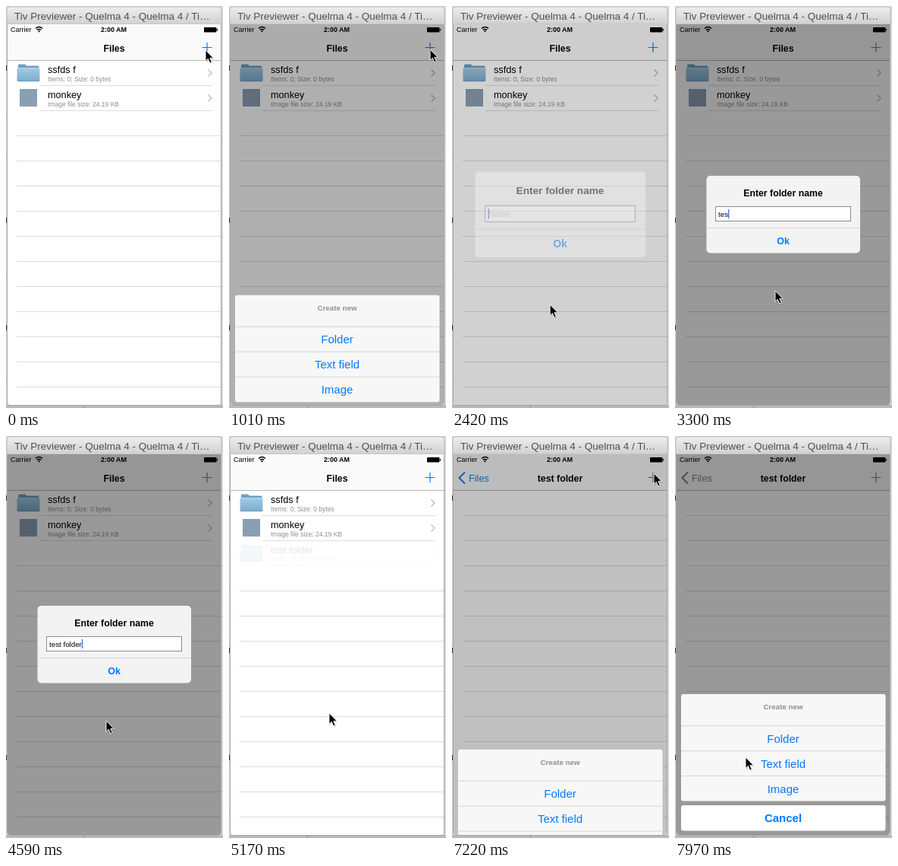
These frames come from a looping animation (286x528 px, 8000 ms). An HTML page:

```html
<!DOCTYPE html>
<html lang="en">
<head>
<meta charset="utf-8">
<title>Files</title>
<style>
  html, body { margin: 0; width: 100%; height: 100%; overflow: hidden; background: #d6d6d6; }
  svg { display: block; }
  text { font-family: "Liberation Sans", Arial, sans-serif; white-space: pre; }
  .mid { text-anchor: middle; }
  .bold { font-weight: 700; }
  .head { font-size: 12.3px; font-weight: 700; }
  .name { font-size: 12.7px; }
  .info { font-size: 8.5px; fill: #8e8e93; }
  .status { font-size: 9px; }
  .choice { font-size: 15px; fill: #007aff; text-anchor: middle; }
  .input { font-size: 9.75px; }
  .line { stroke: #dcdcde; }
  .rule { stroke: #d6d6d8; }
  .tint { stroke: var(--tint); fill: none; }
  .label { fill: var(--tint); }
</style>
</head>
<body>
<svg id="stage" width="286" height="528" viewBox="0 0 286 528">
  <defs>
    <linearGradient id="bar" x2="0" y2="1">
      <stop stop-color="#eeeeee"/><stop offset="1" stop-color="#d0d0d0"/>
    </linearGradient>
    <linearGradient id="paper" x2="0" y2="1">
      <stop stop-color="#a3cbe4"/><stop offset="1" stop-color="#7aaccd"/>
    </linearGradient>
    <clipPath id="screen"><path d="M2 24H283V520Q283 524 279 524H6Q2 524 2 520Z"/></clipPath>
    <g id="folder">
      <path d="M16 78Q16 76.500 17.500 76.500H25L27 78.500H42Q43.500 78.500 43.500 80V85H16Z" fill="#6d9fc2"/>
      <rect x="14.500" y="81" width="30" height="18" rx="1.500" fill="url(#paper)"/>
      <path d="M15 81.500H44" stroke="#bcdcee"/>
      <path d="M15.500 98.700H43.500" stroke="#6795b5" stroke-width=".8"/>
    </g>
    <path id="more" d="M266.500 83.500L271 88L266.500 92.500" fill="none" stroke="#c2c2c7" stroke-width="1.500"/>
  </defs>

  <!-- desktop behind the window -->
  <rect width="286" height="528" fill="#d6d6d6"/>
  <path d="M0 147.500H2M0 200.500H2M0 352.500H2M0 493.500H2" stroke="#aaa"/>
  <path d="M0 78V85M0 278V285M0 419V426" stroke="#333" stroke-width="2"/>
  <rect y="524" width="286" height="4" fill="#b9b9b9"/>
  <path d="M103.500 524V528" stroke="#8c8c8c"/>
  <path d="M1.500 24V521Q1.500 524.500 6 524.500H279Q283.500 524.500 283.500 520V24" fill="none" stroke="#a5a5a5"/>

  <path d="M1 24V6Q1 1 6 1H279Q284 1 284 6V24Z" fill="url(#bar)" stroke="#b4b4b4" stroke-width=".8"/>
  <text x="11" y="18" font-size="13.500" fill="#505050">Tiv Previewer - Quelma 4 - Quelma 4 / Ti…</text>

  <g clip-path="url(#screen)">
    <rect x="2" y="24" width="281" height="500" fill="#fff"/>
    <g id="home"></g>
    <g id="inner"></g>

    <rect x="2" y="24" width="281" height="47" fill="#fafafa"/>
    <path d="M2 71.500H283" stroke="#b7b7b9"/>
    <g class="status">
      <text x="6" y="34.300">Carrier</text>
      <text x="142" y="34.300" class="mid bold">2:00 AM</text>
      <path d="M39 29.500Q43.500 25.500 48 29.500M40.800 31.600Q43.500 29.200 46.200 31.600" fill="none" stroke="#000" stroke-width="1.400"/>
      <path d="M42 32.800Q43.500 31.500 45 32.800L43.500 34.800Z"/>
      <rect x="261" y="28" width="16.500" height="6.500" rx="1"/>
      <path d="M278.500 30V32.500" stroke="#000"/>
    </g>
    <text id="homeTitle" x="142.500" y="59.500" class="head mid">Files</text>
    <text id="innerTitle" x="142.500" y="59.500" class="head mid">test folder</text>
    <g id="back">
      <path class="tint" d="M17 47.500L9.500 55L17 62.500" stroke-width="2"/>
      <text id="backLabel" x="22" y="59.500" class="label" font-size="12.700">Files</text>
    </g>
    <path class="tint" d="M258.500 54.500H271.500M265 48V61" stroke-width="1.200"/>

    <rect id="dim" x="2" y="24" width="281" height="500"/>

    <g id="sheet">
      <rect x="8" y="339" width="269.500" height="140.500" rx="3" fill="#f7f7f7"/>
      <path class="rule" d="M8 380.500H277.500M8 413.500H277.500M8 446.500H277.500"/>
      <text x="142.500" y="359.300" class="mid bold" font-size="9.750" fill="#8f8f8f">Create new</text>
      <text x="142.500" y="402.500" class="choice">Folder</text>
      <text x="142.500" y="435.500" class="choice">Text field</text>
      <text x="142.500" y="468.500" class="choice">Image</text>
      <rect x="8" y="485" width="269.500" height="33.500" rx="3" fill="#fff"/>
      <text x="142.500" y="507.300" class="choice bold">Cancel</text>
    </g>

    <g id="alert">
      <rect x="41.500" y="223" width="202.500" height="101.500" rx="5" fill="#f3f3f3"/>
      <text x="142.500" y="250" class="head mid">Enter folder name</text>
      <rect x="53.500" y="263.500" width="178" height="19" fill="#fff" stroke="#8c8c8c"/>
      <text id="hint" x="57" y="276.600" class="input" fill="#c0c0c5">Name</text>
      <text id="typed" x="57" y="276.600" class="input"></text>
      <rect id="caret" y="267" width="1.300" height="12" fill="#3f6bf0"/>
      <path class="rule" d="M41.500 291.500H244"/>
      <text x="142.500" y="312.700" class="mid bold" font-size="12.500" fill="#007aff">Ok</text>
    </g>
  </g>

  <g id="cursor">
    <path d="M1 2V16L4.200 13L6.600 18L9 17L6.800 12H11Z" fill="#000" opacity=".2"/>
    <path d="M0 0V14.300L3.300 11.300L5.700 17L8.200 15.900L5.800 10.400H10.300Z" fill="#000" stroke="#fff" stroke-width=".9"/>
  </g>
</svg>
<script>
const LOOP = 8000, WIDTH = 281, ROW = 33, TOP = 71;
const $ = id => document.getElementById(id);

// Separator lines below list rows, counted from `first`.
const lines = first => {
  let out = '';
  for (let n = first; n <= 13; n++) {
    const y = TOP + n * ROW + 0.5;
    out += `<path class="line" id="${first === 3 ? 'h' + n : 'i' + n}" d="M14 ${y}H283"/>`;
  }
  return out;
};

const row = (n, name, info, icon) => `
  <g id="row${n}">
    <rect id="press${n}" x="2" y="${TOP + n * ROW + 1}" width="281" height="32" fill="#d9d9d9" opacity="0"/>
    ${icon}
    <text x="55" y="${TOP + n * ROW + 16.5}" class="name">${name}</text>
    <text x="55" y="${TOP + n * ROW + 28}" class="info">${info}</text>
    <use href="#more" y="${n * ROW}"/>
    <path class="line" d="M44 ${TOP + (n + 1) * ROW + 0.5}H272"/>
  </g>`;

const folder = n => `<use href="#folder" y="${n * ROW}"/>`;
const picture = '<rect x="18" y="109" width="23" height="23" fill="#8b9fb3"/>';

$('home').innerHTML = lines(3)
  + row(0, 'ssfds f', 'Items: 0; Size: 0 bytes', folder(0))
  + row(1, 'monkey', 'Image file size: 24.19 KB', picture)
  + row(2, 'test folder', 'Items: 0; Size: 0 bytes', folder(2));
$('inner').innerHTML = `<rect x="-2" y="72" width="4" height="452" opacity=".08"/>
  <rect x="2" y="72" width="281" height="452" fill="#fff"/>` + lines(1);

const clamp = x => Math.max(0, Math.min(1, x));
const easeOut = p => 1 - (1 - p) ** 2.2;
const smooth = p => p * p * (3 - 2 * p);
const ramp = (t, start, length) => easeOut(clamp((t - start) / length));

// Pointer stops: time, x, y
const stops = [
  [0, 263, 58], [60, 263, 58], [130, 264, 60], [240, 265, 57],
  [1150, 265, 57], [1540, 129, 393], [2390, 129, 393], [2650, 132, 374],
  [5110, 132, 374], [5170, 132, 364], [5520, 130, 151], [6220, 130, 151],
  [6580, 254.5, 36], [6750, 263, 43], [6800, 263, 43], [6870, 266, 49],
  [7400, 266, 49], [7910, 88, 409], [7965, 88, 409], [7970, 93, 422]
];

function pointer(t) {
  const next = stops.findIndex(s => s[0] > t);
  if (next < 0) return stops[stops.length - 1].slice(1);
  const a = stops[next - 1], b = stops[next];
  const p = smooth((t - a[0]) / (b[0] - a[0]));
  return [a[1] + (b[1] - a[1]) * p, a[2] + (b[2] - a[2]) * p];
}

const word = 'test folder';
const keys = [2880, 3060, 3300, 3540, 3710, 3890, 4010, 4180, 4300, 4410, 4590];

const fade = (id, value) => $(id).setAttribute('opacity', value);
const move = (id, x, y) => $(id).setAttribute('transform', `translate(${x} ${y})`);
const mix = (a, b, p) => a.map((v, i) => Math.round(v + (b[i] - v) * p));

function draw(t) {
  const sheet = t < 5000
    ? ramp(t, 810, 400) - ramp(t, 1885, 265)
    : ramp(t, 7080, 400);
  const alertIn = ramp(t, 2330, 380), alertOut = ramp(t, 4730, 270);
  const shown = alertIn - alertOut;
  const dim = Math.max(sheet, shown);

  fade('dim', 0.4 * dim);
  $('stage').style.setProperty('--tint', `rgb(${mix([0, 122, 255], [128, 128, 130], dim ** 3)})`);
  move('sheet', 0, 189 * (1 - sheet));
  fade('sheet', sheet > 0 ? 1 : 0);

  const scale = 1.2 - 0.2 * alertIn;
  fade('alert', shown);
  $('alert').setAttribute('transform', `translate(142.5 274) scale(${scale}) translate(-142.5 -274)`);
  const count = keys.filter(k => k <= t).length;
  $('typed').textContent = word.slice(0, count);
  fade('hint', count ? 0 : 1);
  $('caret').setAttribute('x', 57 + (count ? $('typed').getComputedTextLength() : 0));

  // The new row fades in where an empty one was.
  const added = smooth(clamp((t - 5110) / 310));
  fade('row2', added);
  fade('h3', t < 5110 ? 1 : 0);
  fade('press2', t >= 5990 ? 1 : 0);

  const push = ramp(t, 6010, 480);
  move('home', -0.3 * WIDTH * push, 0);
  move('inner', WIDTH * (1 - push), 0);
  fade('inner', push > 0 ? 1 : 0);
  move('homeTitle', -107 * push, 0);
  fade('homeTitle', clamp(1 - push * 1.6));
  move('innerTitle', 120 * (1 - push), 0);
  fade('innerTitle', push);
  move('backLabel', 107 * (1 - push), 0);
  fade('back', clamp(push * 1.6 - 0.6));

  move('cursor', ...pointer(t));
}

function tick() {
  draw(performance.now() % LOOP);
  requestAnimationFrame(tick);
}
tick();
</script>
</body>
</html>
```
